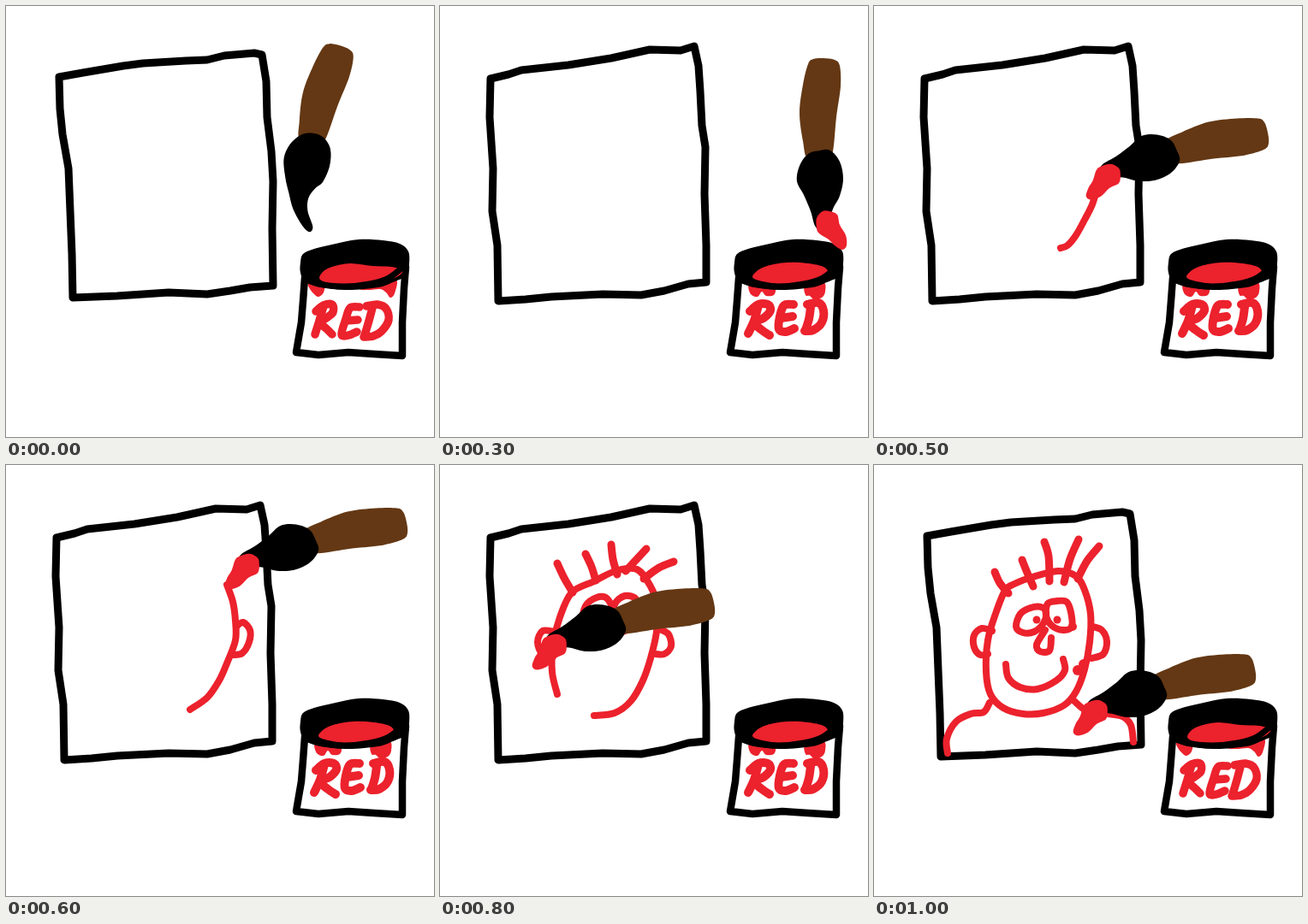
Recreate the animation shown at these times as an HTML page. Size 500 by 504 pixels, loop 1.1 s.

```html
<!DOCTYPE html>
<html lang="en">
<head>
<meta charset="utf-8">
<title>Painting a portrait</title>
<style>
  html, body { margin: 0; width: 100%; height: 100%; overflow: hidden; background: #fff; }
  svg { display: block; width: 500px; height: 504px; }
  path { stroke-linecap: round; stroke-linejoin: round; }
</style>
</head>
<body>
<svg id="stage" viewBox="0 0 500 504"></svg>
<script>
const RED = '#ec222d', BROWN = '#643814', BLACK = '#000';
const STEP = 100;

// Smooth curve through a list of points; a trailing "z" closes it.
function curve(text) {
  const closed = text.endsWith('z');
  const pts = text.replace('z', '').trim().split(/\s+/).map(p => p.split(',').map(Number));
  const n = pts.length;
  const at = i => closed ? pts[(i + n) % n] : pts[Math.max(0, Math.min(n - 1, i))];
  let d = 'M' + pts[0];
  for (let i = 0; i < (closed ? n : n - 1); i++) {
    const [a, b, c, e] = [at(i - 1), at(i), at(i + 1), at(i + 2)];
    const c1 = b.map((v, k) => v + (c[k] - a[k]) / 6);
    const c2 = c.map((v, k) => v - (e[k] - b[k]) / 6);
    d += `C${c1} ${c2} ${c}`;
  }
  return d + (closed ? 'Z' : '');
}

const fill = (pts, color) => `<path d="${curve(pts)}" fill="${color}"/>`;
const line = (d, color, width) =>
  `<path d="${d}" fill="none" stroke="${color}" stroke-width="${width}"/>`;
const paint = (list, width = 8) => list.map(p => line(curve(p), RED, width)).join('');
const dot = (x, y, r = 4.5) => `<circle cx="${x}" cy="${y}" r="${r}" fill="${RED}"/>`;

const frames = {
  square: 'M62 83L90 78L137 70L160 67L210 64L235 63L255 58L290 55L299 57L304 88L305 130L310 170L312 205L311 260L312 327L285 329L262 333L235 337L190 335L130 339L78 341L77 290L75 240L73 190L66 150L63 120Z',
  skewed: 'M59 85L80 80L95 75L150 69L200 61L245 51L281 52L297 47L302 70L304 100L306 140L310 165L309 220L311 280L311 323L290 325L262 333L235 338L190 337L130 340L100 343L68 345L67 280L61 240L62 190L58 130Z'
};
const easel = kind => line(frames[kind], BLACK, 9);

const labels = {
  square: paint([
    '371,351 366,368 361,384', '362,357 371,350 381,349 382,358 374,365 367,370 375,378 381,384',
    '413,352 402,353 397,366 392,384 400,385 410,381', '397,368 411,367',
    '428,353 424,368 419,385', '421,351 434,349 444,354 447,367 439,380 429,386 418,387'
  ], 9.5) +
    fill('354,323 371,325 371,335 365,340 359,336 354,329z', RED) +
    fill('414,331 437,322 456,320 454,336 449,341 444,335 437,331 424,332z', RED),
  skewed: paint([
    '372,350 367,368 360,383', '362,357 372,349 383,349 386,356 378,365 367,370 376,379 385,385',
    '413,349 402,350 397,363 396,378 404,381 414,377', '398,365 412,363',
    '433,352 431,366 427,379', '429,349 442,347 448,356 446,370 436,379 426,380'
  ], 10) +
    fill('361,326 376,328 391,330 390,338 381,339 376,334 371,340 363,337z', RED) +
    fill('427,327 448,323 450,334 446,341 437,343 432,339 427,338z', RED)
};

const openings = {
  square: '367,320 370,311 381,305 402,301 428,304 450,305 463,309 458,316 440,322 418,325 385,325z',
  skewed: '367,319 369,311 382,304 405,300 430,301 448,305 453,312 444,319 424,324 395,325z'
};

const can = kind =>
  labels[kind] +
  line('M349 318L347 345L345 370L339 405L365 408L400 405L430 407L463 409L463 370L465 330L467 305', BLACK, 8.5) +
  fill('344,300 347,290 360,284 385,278 412,273 440,274 460,278 470,287 471,302 468,315 452,323 435,329 400,332 370,329 350,323 344,312z', BLACK) +
  fill(openings[kind], RED) +
  line(curve('350,318 365,325 395,328 425,325 447,318 464,305'), BLACK, 7);

function brush([x, y, turn], wet) {
  const tip = wet
    ? fill('-4,48 3,40 11,40 20,44 23,56 30,68 31,80 26,85 17,80 10,73 -1,66 -4,60z', RED)
    : '';
  const bristles = wet
    ? '0,-31 12,-31 23,-18 27,2 23,22 16,35 11,47 0,60 -6,57 -11,40 -19,21 -27,5 -24,-13 -14,-27z'
    : '0,-32 12,-30 23,-19 27,0 24,20 17,30 12,43 15,58 25,74 23,81 13,76 -2,60 -12,42 -20,26 -27,5 -24,-13 -14,-27z';
  return `<g transform="translate(${x} ${y}) rotate(${turn})">` +
    fill('-14,-20 -20,-42 -24,-75 -20,-108 -14,-132 -8,-138 4,-139 17,-137 23,-130 24,-106 19,-70 15,-30 8,-16z', BROWN) +
    fill(bristles, BLACK) + tip + '</g>';
}

const startStroke = paint(['218,283 226,280 236,268 246,250 255,232 261,212']);
const sideEar = '269,189 277,184 285,193 284,207 276,220 265,222';
const sideFace = '215,286 235,272 249,252 258,232 268,205 268,182 265,160 258,140';

const profile = paint([sideFace, sideEar]);

const profileEyes = paint([
  sideFace + ' 250,129 241,122 228,122', sideEar,
  '190,154 180,156 171,171 167,188 176,197 186,195 196,183 200,167 197,157z',
  '211,163 203,176 204,195 213,202 225,195 235,180 237,168 226,161z'
]) + dot(183, 183) + dot(212, 185) + paint(['168,190 176,197 188,190'], 6);

const hair = paint([
  '137,115 145,132 155,149', '170,104 177,119 182,135', '200,93 202,110 207,128',
  '241,98 229,111 217,124', '273,113 256,120 238,133'
], 9);

const headParts = [
  '137,268 131,242 132,210 140,178 154,149 180,136 205,124 230,122 246,142 254,165 253,195 246,226 237,252 223,276 204,290 180,293',
  '133,195 120,194 114,207 120,222 132,224',
  '257,192 267,198 270,212 262,221 252,221',
  '183,155 170,165 166,187 174,203 188,203 199,190 202,171 195,156z',
  '216,153 204,163 202,184 210,195 222,190 230,174 229,157z'
];
const head = hair + paint(headParts) + dot(185, 178) + dot(215, 176);

const shoulder = head + paint([
  '196,207 189,218 193,228 202,221 203,212z',
  '157,217 149,227 147,238 155,249',
  '85,337 85,323 92,312 105,302'
]);

const portrait = paint([
  '141,125 147,138 157,150', '173,111 179,126 186,142', '199,90 204,107 205,136',
  '239,87 229,110 222,137', '263,95 249,112 238,133'
], 9) + paint([
  '153,147 142,174 133,205 131,242 136,268 151,284 174,291 198,290 222,281 236,265 246,239 252,207 253,174 246,146 236,130 215,124 185,131 164,139z',
  '138,194 126,191 117,199 117,213 124,222 133,221',
  '255,189 266,193 272,206 268,221 254,226',
  '154,233 157,249 171,260 191,262 213,252 223,240 221,227',
  '183,167 171,174 166,189 174,196 187,195 198,185 201,172 195,166z',
  '203,162 214,159 225,160 230,172 231,189 221,193 208,188 201,176z',
  '200,193 190,210 194,218 205,217 207,202',
  '86,337 85,320 96,300 113,291 128,289 135,278',
  '232,274 243,284 253,290', '274,291 290,294 300,304 303,324'
]) + dot(190, 181) + dot(214, 181) + dot(238, 240, 6) + dot(245, 233, 6) + dot(232, 189, 5);

// Each step: canvas and can drawing, painting so far, brush x, y and angle, wet tip.
const steps = [
  ['square', '', [352, 180, 14], false],
  ['square', '', [385, 196, 7], false],
  ['square', '', [407, 245, 0], false],
  ['skewed', '', [444, 200, 0], true],
  ['skewed', '', [385, 185, 42], true],
  ['skewed', startStroke, [324, 177, 76], true],
  ['skewed', profile, [332, 96, 76], true],
  ['skewed', profileEyes, [201, 107, 76], true],
  ['skewed', head, [184, 190, 76], true],
  ['skewed', shoulder, [167, 275, 76], true],
  ['square', portrait, [309, 267, 76], true]
];

const stage = document.getElementById('stage');
stage.innerHTML = steps.map(([kind, art, pose, wet]) =>
  `<g display="none">${easel(kind)}${art}${can(kind)}${brush(pose, wet)}</g>`).join('');
const scenes = [...stage.children];

let shown = -1;
const start = performance.now();
function tick() {
  const now = Math.max(0, performance.now() - start);
  const next = Math.floor(now / STEP) % scenes.length;
  if (next !== shown) {
    scenes.forEach((s, i) => s.setAttribute('display', i === next ? 'inline' : 'none'));
    shown = next;
  }
  requestAnimationFrame(tick);
}
tick();
</script>
</body>
</html>
```
